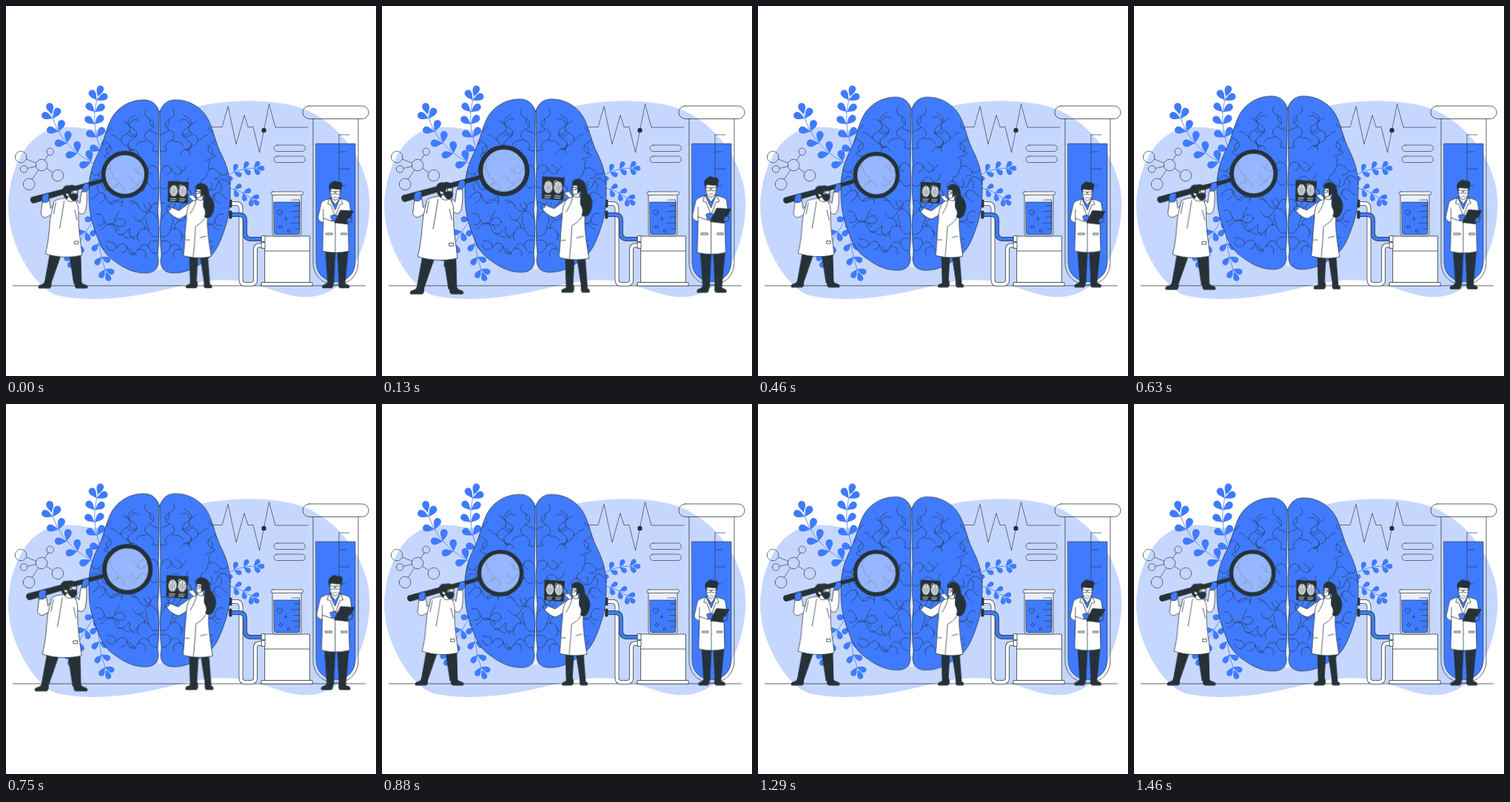
These frames come from a looping animation (500x500 px, 1500 ms). An HTML page:

```html
<!DOCTYPE html>
<html lang="en">
<head>
<meta charset="utf-8">
<title>Brain research</title>
<style>
  html, body { margin: 0; width: 100%; height: 100%; overflow: hidden; background: #fff; }
  svg { display: block; width: 100vw; height: 100vh; }
  .line { fill: none; stroke: #263238; stroke-width: .75; stroke-linecap: round; stroke-linejoin: round; }
  .thin { stroke-width: .65; }
  .blue { fill: #407bff; }
  .white { fill: #fff; }
  .dark { fill: #263238; }
  .stem { fill: none; stroke: #407bff; stroke-width: .8; }
  .float { animation: float 1.5s linear -20ms infinite; }
  .beat { animation: beat 1.5s linear -20ms infinite; }
  #seeker { transform-origin: 113px 289px; }
  #doctor { transform-origin: 250px 310px; }
  #writer { transform-origin: 448px 309px; }
  @keyframes float { 50% { transform: translateY(-6px); } }
  @keyframes beat {
    0%, 30%, 40%, 60%, 100% { transform: scale(1); }
    10%, 50% { transform: scale(1.1); }
  }
</style>
</head>
<body>
<svg viewBox="0 0 500 500">
  <defs>
    <path id="shoe" class="dark" d="M9 -7Q8 -3 2 -2Q-1 0 1 2H15Q18 1 17 -6Z"/>
    <path id="lobe" d="M207 143C203 130 194 127 186 127C166 127 150 138 142 153C135 167 133 180 127 194C121 207 112 222 112 250C112 268 113 283 119 300C125 318 131 334 144 343C156 352 170 361 188 361C201 361 206 354 206 344Q204 337 206 325Q208 300 205 275Q208 250 206 220Q207 180 207 143Z"/>
    <clipPath id="inside"><use href="#lobe"/></clipPath>
    <g id="scan">
      <ellipse rx="5.200" ry="7.500" fill="#d5d8da" stroke="#77838a" stroke-width=".7"/>
      <path fill="none" stroke="#77838a" stroke-width=".7" d="M0 -7V7M-4 -3Q0 0 -3 4M4 -3Q0 0 3 4"/>
      <path fill="none" stroke="#fff" stroke-width=".8" d="M-4 10.500H4M-4 13H3"/>
    </g>
  </defs>

  <path fill="#c6d7ff" d="M3 271C4 226 22 183 55 169C88 156 112 171 145 168C190 162 216 144 262 135C306 126 363 125 402 139C446 156 477 197 488 239C497 277 487 329 463 362C445 388 419 397 390 392C363 387 341 374 309 371C264 367 232 381 188 389C143 397 103 399 69 391C38 380 3 322 3 271Z"/>
  <path class="line" d="M9.500 378H485.500"/>

  <g id="molecule" class="line thin"></g>
  <g class="line thin">
    <path d="M276 163.500H292L300 135.500L311 187L322 147.500L327 163.500H334L342.500 198L355.500 132.500L364 164H408"/>
    <rect x="362" y="188" width="42.500" height="8.500" rx="4.200"/>
    <rect x="362" y="203" width="42.500" height="8.500" rx="4.200"/>
  </g>
  <circle cx="348.500" cy="168" r="3.200" class="dark"/>

  <g id="plants"></g>

  <!-- test tube -->
  <g class="line">
    <path class="blue thin" d="M419 186H472V345C472 382 419 382 419 345Z"/>
    <rect x="401" y="135" width="89" height="17.500" rx="8.700"/>
    <path d="M415 152.500V346C415 387 476 387 476 346V152.500"/>
  </g>

  <!-- tank and pipes -->
  <g id="pipes" fill="none" stroke-linejoin="round"></g>
  <g class="line">
    <path class="dark" d="M302 262h3v10h-3zM302 277h3v10h-3z"/>
    <rect class="white" x="350" y="311" width="60.500" height="62.500"/>
    <path d="M350 331H410.500"/>
    <rect class="white" x="345.500" y="373.500" width="68.500" height="4.700"/>
    <path class="white" d="M345.500 310.500h4.500v8h-4.500zM345.500 319.500h4.500v8h-4.500z"/>
    <path fill="#e8efff" d="M360 255V307Q360 311 364 311H395Q399 311 399 307V255Z"/>
    <path class="blue thin" d="M362 265H397V306Q397 309 394 309H365Q362 309 362 306Z"/>
    <rect class="white" x="358" y="251" width="43.500" height="4.300" rx="2"/>
    <g class="thin"><circle cx="370" cy="279" r="3.400"/><circle cx="378" cy="287.500" r="1.300"/><circle cx="371" cy="298.500" r="2"/><circle cx="382" cy="304" r="1.900"/></g>
  </g>
  <g id="ticks" class="line thin"></g>

  <g class="float">
    <path fill="#e6edff" d="M203 138H212L210 357H205Z"/>
    <g id="half" class="line">
      <use href="#lobe" class="blue"/>
      <g id="folds" class="thin" clip-path="url(#inside)"></g>
    </g>
    <use href="#half" transform="matrix(-1 0 0 1 415 0)"/>
  </g>

  <!-- man with magnifier -->
  <g id="seeker" class="beat">
    <circle cx="160" cy="228.500" r="28" fill="#fff" opacity=".45"/>
    <g class="line">
      <path class="dark" d="M60 334L53 373L61 375L75 335ZM86 335L92 374L102 373L101 334Z"/>
      <use href="#shoe" transform="translate(44.500 378)"/>
      <use href="#shoe" transform="translate(110.500 378) scale(-1 1)"/>
    </g>
    <path class="dark" d="M36 258.500Q33.500 260 34 263Q35 267 38.500 267L82 254L132 238.500L131 234L80 247Z"/>
    <g class="line">
      <path class="white" d="M50 265L48 281Q49 285 54 286L68 279V266L61 274L59 262ZM97 263L100 267L102 252L109 250Q110 264 108 274Q107 282 101 281L93 276Z"/>
      <path class="white" d="M66 264C73 259 87 259 93 263C99 268 98 277 98 286C98 302 101 318 103 336C87 340 68 339 54 334C59 316 59 298 61 284Z"/>
      <path d="M68 266Q66 274 65 281M93 276Q95 283 96 289M93 317.500H98V321H93ZM79 264Q76 284 73 300"/>
      <path class="white" d="M79 252Q79 261 85 264Q92 266 95 261L97 251L93 245H82Z"/>
      <path class="dark" d="M78 253C75 247 80 242 86 243.500C91 241 97 245 96 249L89 250L88 255L91 254L97 255C98 261 95 265 90 263L85 257L83 261C79 259 78 257 78 253Z"/>
      <path class="white" d="M83 254Q80 252 82 257Q85 259 86 255Z"/>
      <path d="M91 250H97V253.500H91ZM86 251.500H91"/>
      <path class="blue" d="M50 265Q48 257 52 255Q58 252 59 256L58 264Q55 267 50 265ZM103 251Q103 243 107 240H111Q114 243 111 248L109 251Z"/>
    </g>
    <circle cx="160" cy="228.500" r="28.700" fill="none" stroke="#263238" stroke-width="5.500"/>
  </g>

  <!-- woman with scan -->
  <g id="doctor" class="beat">
    <path class="dark" d="M219.500 237.500L247 239L245.500 267L219 265Z"/>
    <use href="#scan" transform="translate(227 250.500) rotate(3)"/>
    <use href="#scan" transform="translate(239 251) rotate(3)"/>
    <circle cx="236" cy="244.500" r="1.800" fill="none" stroke="#fff" stroke-width=".8"/>
    <g class="line">
      <path class="dark" d="M248 335L249 374L257 375L259 337ZM262 336L268 375L275 375L272 335Z"/>
      <use href="#shoe" transform="translate(243 378) scale(.9 1)"/>
      <use href="#shoe" transform="translate(278 378) scale(-.62 1)"/>
      <path class="white" d="M249 266L234 277L222 272L219 277Q227 287 235 288Q242 285 250 277Z"/>
      <path class="white" d="M252 264C260 259 270 262 271 268C274 278 271 289 272 299C273 314 275 326 277 338C265 341 251 340 240 337C242 320 242 302 244 288C244 277 246 268 252 264Z"/>
      <path class="white" d="M253 264L246 257L249 252L257 262ZM256 256Q258 265 265 263L267 251H257Z"/>
      <path d="M243 316H248M262 313L270 311M256 298Q265 293 268 287M257 262Q256 270 249 281M256 299Q255 319 253 338"/>
      <path class="white" d="M258 247L257 252L255 253L257 255V259Q260 261 264 258L266 247Z"/>
      <path class="dark" d="M257 244C260 239 269 240 272 246C274 250 273 254 275 258C282 264 283 276 276 285Q271 288 268 285Q271 279 267 273C265 265 269 260 267 255L263 258L263 249L257 248Z"/>
      <path d="M257 251H261V254H257ZM261 252H264"/>
      <path class="blue" d="M222 272Q218 271 217.500 274L219 278L223 275ZM246 257Q243 252 245 249L249 250L251 256Z"/>
    </g>
  </g>

  <!-- man with tablet -->
  <g id="writer" class="beat">
    <g class="line">
      <path class="dark" d="M432 330L435 374L443 374L445 332ZM448 332L450 374L458 374L462 330Z"/>
      <use href="#shoe" transform="translate(427.500 378) scale(.85 1)"/>
      <use href="#shoe" transform="translate(464 378) scale(-.85 1)"/>
      <path class="white" d="M437 261C431 263 427 264 426 268L422 286Q422 291 429 293L428 331Q446 335 463 331L462 294L467 288L464 267C463 264 458 262 452 261Z"/>
      <path class="blue" d="M438 261L445 276L451 261Z"/>
      <path class="white" d="M440 256V262L445 269L450 262V256Z"/>
      <path d="M437 261L435 268L439 269L445 285M452 261L455 268L451 269L445 285V332M429 293V275M429 287L440 291M433 307H441V309H433ZM453 307H460V309H453Z"/>
      <path class="white" d="M438 248V254Q440 262 445 263Q450 262 452 254V248Z"/>
      <path class="dark" d="M438 251Q435 242 440 240Q443 236 448 239Q454 238 454 243L452 251L451 248Q444 249 440 246Z"/>
      <path class="thin" d="M439 251H444V255H439ZM446 251H451V255H446ZM444 252H446M443 259H447"/>
      <path class="blue" d="M439 284Q445 281 449 285L448 290L441 291Z"/>
      <path class="dark" d="M452 276.500L469 277.500L461 295L444 293Z"/>
      <path class="blue" d="M462 287L467 286L466 292L460 293Z"/>
    </g>
  </g>
</svg>
<script>
  const { sin, cos, atan2, PI } = Math;
  const byId = id => document.getElementById(id);
  const add = (parent, d, attrs = {}) => {
    const p = document.createElementNS('http://www.w3.org/2000/svg', 'path');
    p.setAttribute('d', d);
    for (const k in attrs) p.setAttribute(k, attrs[k]);
    parent.append(p);
  };

  // Teardrop with its narrow end at (x, y).
  const leaf = (x, y, angle, len) => {
    const at = (along, side) => {
      const u = along * len, v = side * len;
      return `${x + u * cos(angle) - v * sin(angle)} ${y + u * sin(angle) + v * cos(angle)} `;
    };
    return `M${x} ${y}C${at(.3, .12)}${at(.45, .32)}${at(.75, .29)}` +
      `C${at(1.08, .24)}${at(1.08, -.24)}${at(.75, -.29)}C${at(.45, -.32)}${at(.3, -.12)}${x} ${y}Z`;
  };

  // Quadratic stem with leaf pairs and one leaf on the end.
  const sprig = (x0, y0, x1, y1, x2, y2, pairs, len) => {
    const mix = (a, b, c, t) => a * (1 - t) ** 2 + 2 * b * t * (1 - t) + c * t * t;
    const slope = (a, b, c, t) => (b - a) * (1 - t) + (c - b) * t;
    let d = leaf(x2, y2, atan2(y2 - y1, x2 - x1), len);
    for (let i = 0; i < pairs; i++) {
      const t = .12 + .82 * i / (pairs - 1);
      const x = mix(x0, x1, x2, t), y = mix(y0, y1, y2, t);
      const a = atan2(slope(y0, y1, y2, t), slope(x0, x1, x2, t));
      d += leaf(x, y, a - .85, len) + leaf(x, y, a + .85, len);
    }
    add(byId('plants'), `M${x0} ${y0}Q${x1} ${y1} ${x2} ${y2}`, { class: 'stem' });
    add(byId('plants'), d, { class: 'blue' });
  };
  sprig(133, 207, 112, 160, 124, 123, 5, 16);
  sprig(127, 217, 74, 193, 62, 147, 5, 16.5);
  sprig(126, 280, 100, 312, 90, 341, 4, 13.5);
  sprig(124, 292, 124, 330, 135, 359, 4, 13.5);
  sprig(290, 235, 312, 218, 338, 219, 4, 11.5);
  sprig(288, 244, 316, 246, 333, 261, 4, 11.5);

  // Meandering furrow with short side branches.
  let seed = 7;
  const rnd = () => (seed = seed * 16807 % 2147483647) / 2147483647;
  const furrow = (x, y, heading, len, branches = true) => {
    const phase = rnd() * 6;
    let d = `M${x} ${y}`, side = rnd() < .5 ? 1 : -1;
    for (let s = 3; s < len; s += 3) {
      const a = heading + 1.05 * sin(s / 6.5 + phase);
      x += 3 * cos(a);
      y += 3 * sin(a);
      d += `L${x.toFixed(1)} ${y.toFixed(1)}`;
      if (branches && s % 18 === 0) {
        furrow(x, y, a + side * 1.2, 12 + 7 * rnd(), false);
        side = -side;
      }
    }
    add(byId('folds'), d);
  };
  for (let i = 0; i < 4; i++) furrow(142 + 16 * i, 164 - 8 * i, PI / 2, 56 + 6 * i);
  for (let i = 0; i < 6; i++) {
    furrow(206, 223 + 22 * i, PI, 50);
    furrow(113 + i * i * .9, 219 + 21 * i, .2, 56);
  }

  // Arms of the molecule: angle, length, radius.
  const ring = (x, y, r) => `M${x - r} ${y}a${r} ${r} 0 1 0 ${2 * r} 0a${r} ${r} 0 1 0 ${-2 * r} 0`;
  const arm = (angle, len, r) => {
    const at = k => `${48 + k * cos(angle)} ${215 + k * sin(angle)}`;
    add(byId('molecule'), `M${at(7.8)}L${at(len - r)}` + ring(48 + len * cos(angle), 215 + len * sin(angle), r));
  };
  add(byId('molecule'), ring(48, 215, 7.8));
  arm(-2.77, 30, 7.8);
  arm(-1, 21.5, 4.8);
  arm(.57, 26, 7.8);
  arm(2.15, 31, 7.8);
  arm(2.92, 24.5, 4.8);

  const ticks = (x, y, gap, count, width) => {
    let d = `M${x} ${y}v${gap * (count - 1)}`;
    for (let i = 0; i < count; i++) d += `M${x} ${y + gap * i}h${width * (i % 2 ? .65 : 1)}`;
    add(byId('ticks'), d);
  };
  ticks(450, 174, 23, 4, 14);
  ticks(396.5, 262, 7.8, 6, -10.5);

  const pipe = (d, color) => {
    add(byId('pipes'), d, { stroke: '#263238', 'stroke-width': 5.8 });
    add(byId('pipes'), d, { stroke: color, 'stroke-width': 4.3 });
  };
  pipe('M305 267H311Q317.500 267 317.500 274V370Q317.500 376 323 376H331Q337 376 337 370V330Q337 323.500 342 323.500H346', '#fff');
  pipe('M305 282H315Q323 282 323 290V307Q323 315 331 315H346', '#407bff');
</script>
</body>
</html>
```
